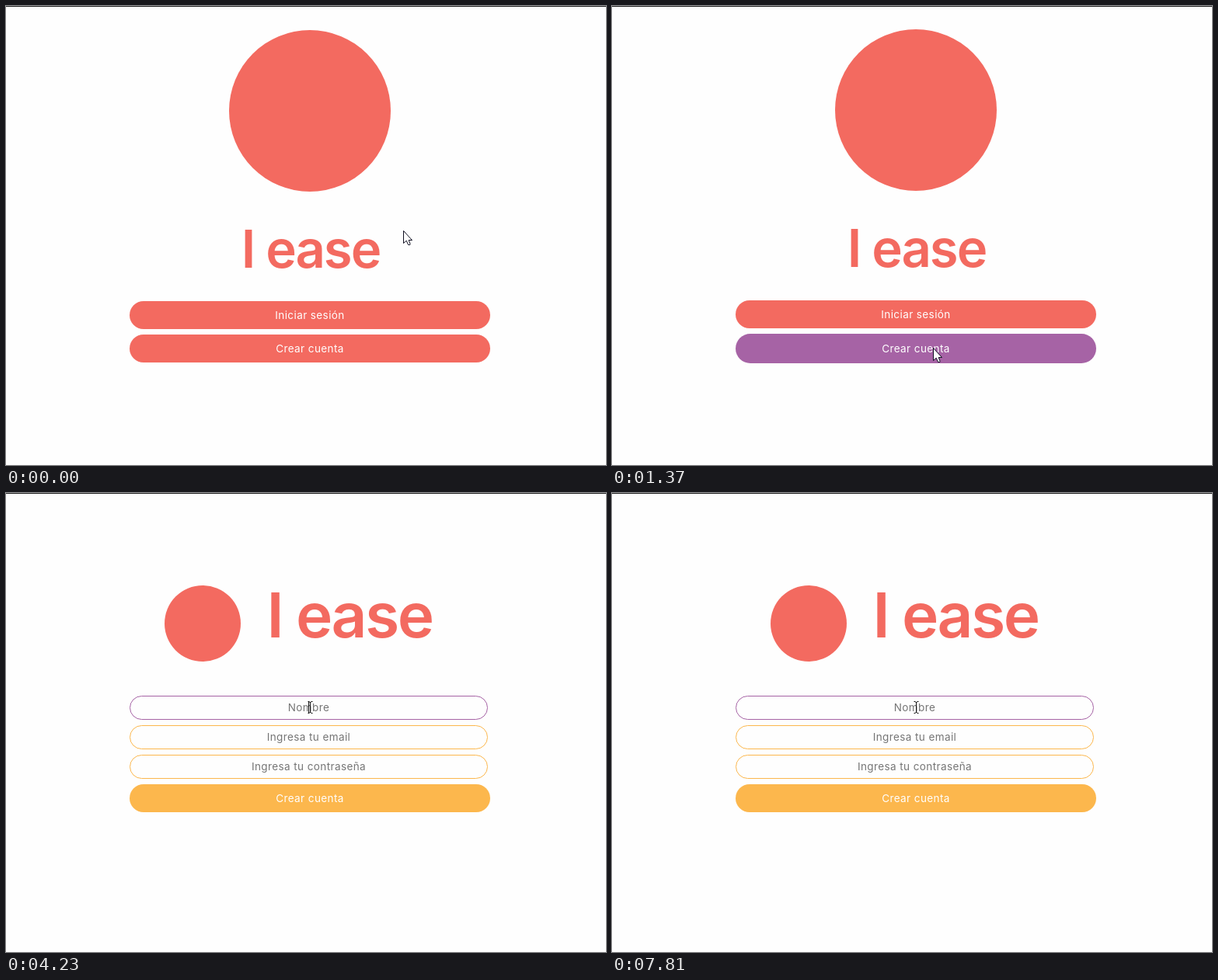
These frames come from a looping animation (772x591 px, 8 s). An HTML page:

```html
<!DOCTYPE html>
<html lang="es">
<head>
<meta charset="utf-8">
<title>I ease</title>
<style>
  html, body { margin: 0; width: 100%; height: 100%; overflow: hidden; background: #fefefe; }
  svg { display: block; width: 772px; height: 591px; --coral: #f36a60; --amber: #fcb74d; --plum: #a663a5; }
  text { font: 400 13.5px Inter, sans-serif; letter-spacing: .03em; text-anchor: middle; fill: #757575; }
  .logo { fill: var(--coral); }
  .title { font-weight: 600; letter-spacing: -.03em; fill: var(--coral); }
  .label { fill: #fff; }
  .field { fill: #fefefe; stroke: var(--amber); }
  .focus .active { stroke: var(--plum); }
  .coral { fill: var(--coral); }
  .amber { fill: var(--amber); }
  .hover .second { fill: var(--plum); y: 422px; height: 38px; rx: 19px; }
  .hover .lift { transform: translateY(-1px); }
</style>
</head>
<body>
<svg viewBox="0 0 772 591">
  <rect width="772" height="1" fill="#222"/>

  <g id="welcome">
    <g class="lift">
      <circle class="logo" cx="391" cy="135" r="104"/>
      <text class="title" x="392" y="337" style="font-size:67px">I ease</text>
      <rect class="coral" x="159" y="380" width="464" height="36" rx="18"/>
      <text class="label" x="391" y="403">Iniciar sesión</text>
    </g>
    <rect class="coral second" x="159" y="423" width="464" height="36" rx="18"/>
    <text class="label" x="391" y="446">Crear cuenta</text>
  </g>

  <g id="signup">
    <circle class="logo" cx="253" cy="168" r="49"/>
    <text class="title" x="442" y="186" style="font-size:80px">I ease</text>
    <rect class="field active" x="159.5" y="261.5" width="460" height="30" rx="15"/>
    <text x="389.5" y="281">Nombre</text>
    <rect class="field" x="159.5" y="299.5" width="460" height="30" rx="15"/>
    <text x="389.5" y="319">Ingresa tu email</text>
    <rect class="field" x="159.5" y="337.5" width="460" height="30" rx="15"/>
    <text x="389.5" y="357">Ingresa tu contraseña</text>
    <rect class="amber" x="159" y="375" width="464" height="36" rx="18"/>
    <text class="label" x="391" y="398">Crear cuenta</text>
    <rect id="caret" x="389" y="268" width="1" height="16" fill="#111"/>
  </g>

  <path id="arrow" d="M.5 .5V16.5L4.2 13.2L6.6 18.5H8.8L9 17.2L7.2 12.5H11.5Z" fill="#fff" stroke="#112" stroke-linejoin="round"/>
  <path id="beam" d="M-3 -7.5H-1M1 -7.5H3M-1 -6.5H1M0 -7V7M-1 7.5H-3M1 7.5H3M-1 6.5H1" fill="none" stroke="#111"/>
</svg>
<script>
const LOOP = 8000;
const HOVER = 1070, SIGNUP = 2740, BEAM = 3710, FOCUS = 4230;
const BLINKS = [FOCUS, 4660, 5260, 5850, 6250, 6810, 7270, 7810];

// Pointer positions: [time, x, y], held until the next one
const POINTER = [
  [0, 511, 289], [130, 521, 301], [250, 514, 323], [400, 484, 326],
  [550, 479, 319], [680, 504, 342], [820, 515, 363], [950, 470, 417],
  [HOVER, 432, 439], [1220, 417, 440], [1370, 413, 440],
  [3450, 411, 437], [3590, 408, 406], [BEAM, 395, 312], [3840, 391.5, 276]
];

const [welcome, signup, caret, arrow, beam] =
  ["welcome", "signup", "caret", "arrow", "beam"].map(id => document.getElementById(id));
const show = (node, on) => node.style.display = on ? "" : "none";

function draw(t) {
  show(welcome, t < SIGNUP);
  show(signup, t >= SIGNUP);
  welcome.classList.toggle("hover", t >= HOVER);
  signup.classList.toggle("focus", t >= FOCUS);
  show(caret, BLINKS.filter(time => time <= t).length % 2);

  const [, x, y] = POINTER.findLast(([time]) => time <= t);
  for (const shape of [arrow, beam]) shape.setAttribute("transform", `translate(${x} ${y})`);
  show(arrow, t < BEAM);
  show(beam, t >= BEAM);
}

function tick() {
  draw(performance.now() % LOOP);
  requestAnimationFrame(tick);
}
tick();
</script>
</body>
</html>
```
